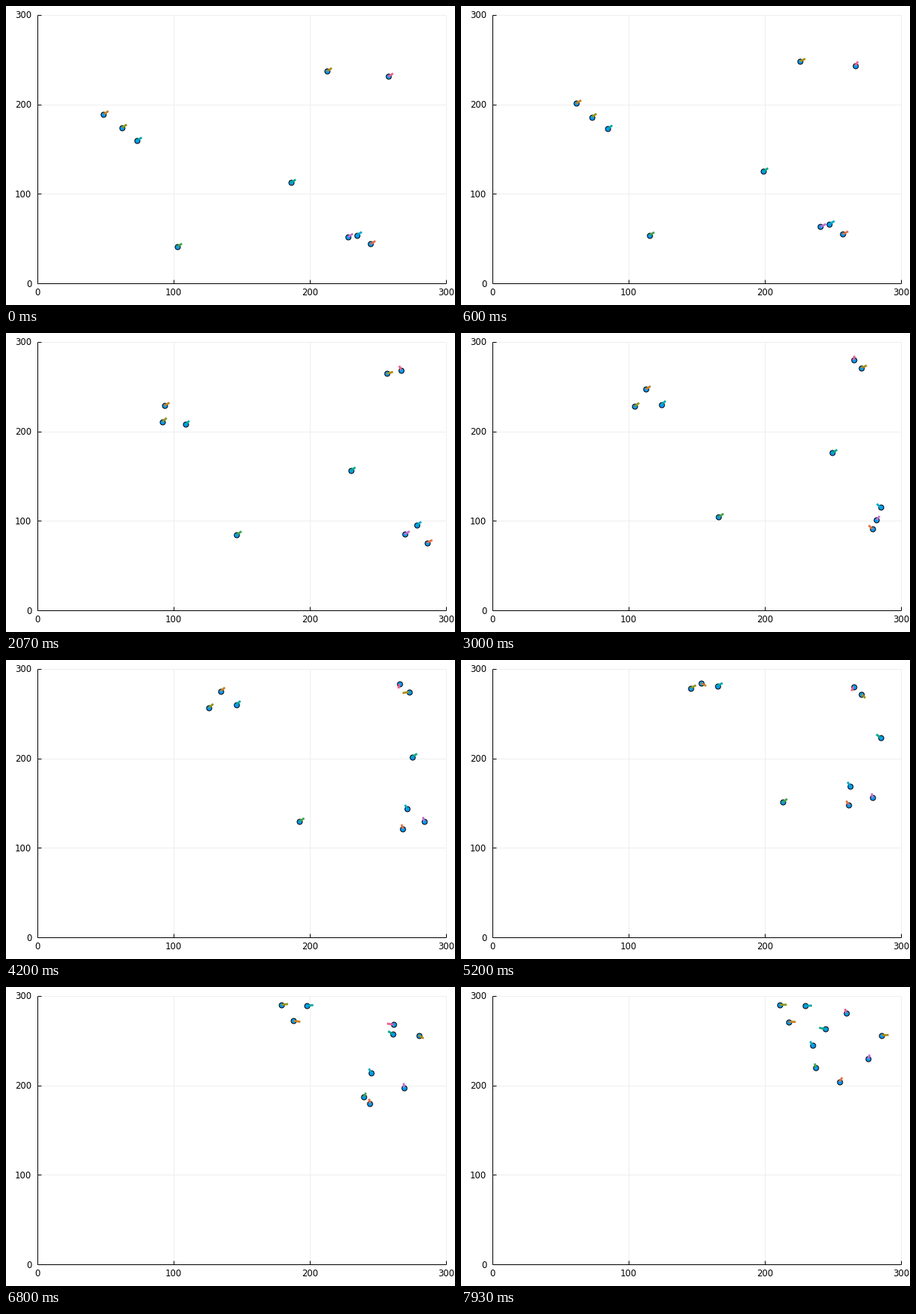
These frames come from a looping animation (600x400 px, 8000 ms). A matplotlib script:

```python
import numpy as np
import matplotlib.pyplot as plt
from matplotlib.animation import FuncAnimation

W, H, DPI = 600, 400, 100
PT = 72 / DPI                          # points per pixel
FRAMES, LOOP_MS = 120, 8000
STEP = LOOP_MS / FRAMES
X0, Y0, SX, SY = 42.2, 371.2, 1.82, 1.198   # plot origin and scale in pixels
WALL, SPEED, ARROW = 290, 2, 5

# Every robot passes its five points at these times; points beyond
# the wall are mirrored back, which makes the bounces.
TIMES = np.array([0, 3000, 5200, 6800, 7900]) / STEP
ROBOTS = {
    "#e36f47": [(244.5, 44), (301, 91), (318.5, 148), (336, 180), (325, 205)],
    "#3ea44e": [(102.5, 41), (166, 104.5), (213, 151), (239.5, 187), (237, 220.5)],
    "#c371d2": [(228, 52), (282, 101), (279, 156), (269, 197.5), (276, 230.5)],
    "#ac8e18": [(212.5, 237), (270.5, 271), (271, 271.5), (280, 256), (286, 256)],
    "#00aaae": [(73, 159.5), (124, 230), (165, 281), (197.5, 289), (230.5, 289)],
    "#ed5e93": [(257.5, 231), (265, 279.5), (265, 280), (261.5, 268), (259.5, 281)],
    "#c68225": [(48.5, 189), (112.5, 247), (153, 296), (188, 308), (218.5, 309)],
    "#00a98d": [(186, 112.5), (249.5, 176), (295, 223), (319, 257), (336, 263)],
    "#8e971e": [(62, 174), (104.5, 228), (145.5, 278.5), (179, 290), (212, 290)],
    "#00a9cc": [(234.5, 54), (295, 115), (317.5, 169), (335, 214), (345.5, 245.5)],
}
POINTS = np.array(list(ROBOTS.values())).swapaxes(0, 1)    # time, robot, xy


def velocities():
    vel = np.empty_like(POINTS)
    span = (TIMES[2:] - TIMES[:-2])[:, None, None]
    vel[0] = SPEED * np.sqrt(0.5)                          # all start at 45°
    vel[1:-1] = (POINTS[2:] - POINTS[:-2]) / span
    vel[-1] = (POINTS[-1] - POINTS[-2]) / (TIMES[-1] - TIMES[-2])
    return vel


VEL = velocities()


def poses(t):
    """Positions and unit headings of all robots on a Hermite spline."""
    k = min(np.searchsorted(TIMES, t, side="right"), len(TIMES) - 1) - 1
    d = TIMES[k + 1] - TIMES[k]
    s = (t - TIMES[k]) / d
    p, q = POINTS[k], POINTS[k + 1]
    m, n = VEL[k] * d, VEL[k + 1] * d
    pos = (p + (q - p) * s * s * (3 - 2 * s)
           + m * s * (1 - s) ** 2 - n * s * s * (1 - s))
    vel = ((q - p) * 6 * s * (1 - s)
           + m * (1 - s) * (1 - 3 * s) + n * s * (3 * s - 2))
    out = pos > WALL
    pos = np.where(out, 2 * WALL - pos, pos)
    vel = np.where(out, -vel, vel)
    return pos, vel / np.linalg.norm(vel, axis=1, keepdims=True)


fig = plt.figure(figsize=(W / DPI, H / DPI), dpi=DPI, facecolor="white")
ax = fig.add_axes([0, 0, 1, 1])
ax.set_xlim(-X0 / SX, (W - X0) / SX)
ax.set_ylim((Y0 - H) / SY, Y0 / SY)
ax.axis("off")


def rule(xs, ys, color, z):
    ax.plot(xs, ys, color=color, lw=PT, zorder=z,
            solid_capstyle="butt", snap=True)


def label(text, x, y, ha):
    ax.text(x, y, text, ha=ha, va="baseline",
            fontfamily="DejaVu Sans", fontsize=8.4)


for v in range(0, 301, 100):
    rule([v, v], [0, 300], "#eeeeee", 1)
    rule([0, 300], [v, v], "#eeeeee", 1)
    rule([v, v], [0, 5 / SY], "black", 2)
    rule([0, 5 / SX], [v, v], "black", 2)
    label(str(v), v, -16 / SY, "center")
    label(str(v), -8 / SX, v - 4.4 / SY, "right")
rule([0, 300], [0, 0], "black", 2)
rule([0, 0], [0, 300], "black", 2)

dots = ax.scatter(*POINTS[0].T, s=(7 * PT) ** 2, c="#009afa",
                  edgecolors="black", linewidths=PT, zorder=3)
arrows = [ax.plot([], [], color=c, lw=2.8 * PT, zorder=4,
                  solid_capstyle="butt")[0] for c in ROBOTS]


def draw(i):
    pos, heading = poses(i)
    dots.set_offsets(pos)
    for arrow, a, b in zip(arrows, pos, pos + ARROW * heading):
        arrow.set_data([a[0], b[0]], [a[1], b[1]])
    return [dots, *arrows]


anim = FuncAnimation(fig, draw, frames=FRAMES, interval=STEP,
                     repeat=True, repeat_delay=0, blit=False)
plt.show()
```
